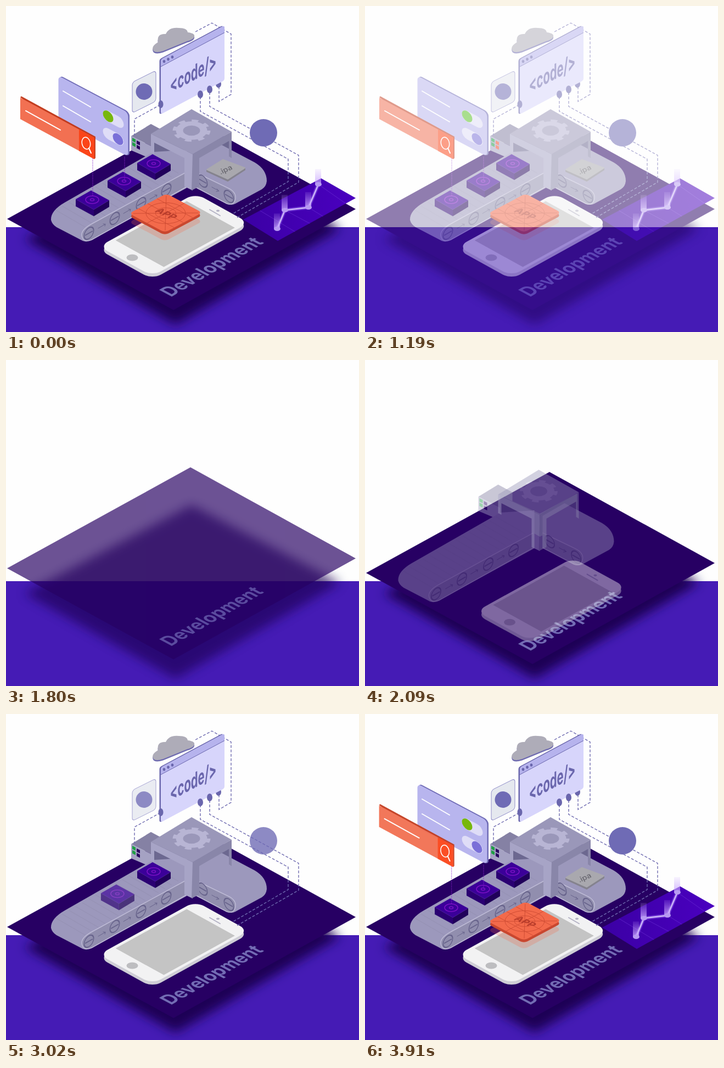
Recreate the animation shown at these times as an HTML page. Size 643 px wide and 594 px high, loop 3.96 s.

```html
<!DOCTYPE html>
<html lang="en">
<head>
<meta charset="utf-8">
<title>Development</title>
<style>
html, body { margin: 0; width: 100%; height: 100%; overflow: hidden; background: #fefefe; }
svg { display: block; width: 643px; height: 594px; --led: #2a0060; --on: #77b70c; }
text { font-family: Inter, "Open Sans", sans-serif; font-weight: 700; text-anchor: middle; }
.line { fill: none; stroke-linecap: round; }
.dash { fill: none; stroke: #6f6bb0; stroke-width: 1.4; stroke-dasharray: 5 3; }
.dots { stroke: #8a28cc; stroke-width: 1.3; stroke-dasharray: 1.3 1.7; }
</style>
</head>
<body>
<svg viewBox="0 0 643 594">
  <defs>
    <filter id="blur" x="-20%" y="-20%" width="140%" height="140%"><feGaussianBlur stdDeviation="10"/></filter>
    <linearGradient id="beam" x2="0" y2="1">
      <stop stop-color="#c9a8ff" stop-opacity=".12"/><stop offset="1" stop-color="#c9a8ff" stop-opacity=".8"/>
    </linearGradient>
    <linearGradient id="plate" x2="1">
      <stop stop-color="#3b00a4"/><stop offset="1" stop-color="#4a00c0"/>
    </linearGradient>
    <g id="roller" fill="none" stroke="#68648c" stroke-width="2">
      <circle r="10" transform="matrix(.866 -.5 0 1 0 0)"/><path d="M-7 4L7-4"/>
    </g>
    <path id="arrow" class="line" stroke="#68648c" d="M-7 4L6-3.5M2-4L6-3.5L5 0"/>
    <g id="cube">
      <path fill="#2a0072" d="M239 286L272 305V317L239 299Z"/>
      <path fill="#20005a" d="M272 305L300 288V300L272 317Z"/>
      <path fill="#3b0099" d="M239 286L267 270L300 288L272 305Z"/>
      <g fill="none" stroke="#7a10c4" stroke-width="1.6">
        <ellipse cx="269" cy="287" rx="12" ry="7"/><ellipse cx="269" cy="287" rx="3.5" ry="2"/>
      </g>
    </g>
    <g id="column">
      <path fill="url(#beam)" d="M-6-28H5V0H-6Z"/><ellipse rx="6" ry="4" fill="#b79af2"/>
    </g>
    <rect id="tile" x="-246" y="510" width="72.4" height="69.4" rx="7"/>
    <rect id="phone" x="-339" y="537.6" width="194" height="107.4" rx="17"/>
    <path id="cloud" d="M269 82Q263 74 277 66Q274 50 291 51Q297 38 315 40Q330 40 331 48Q347 50 342 58Q338 62 330 64L286 82Q273 86 269 82Z"/>
  </defs>

  <path fill="#fefefe" d="M0 0H643V403H0Z"/>
  <path fill="#451bb5" d="M0 403H643V594H0Z"/>

  <!-- data-in: start, duration, starting offset x and y -->
  <g id="scene">
    <path data-in="1620 420 0 0" fill="#1f0055" filter="url(#blur)" d="M338 264L609 406L309 581L34 425Z"/>
    <g data-in="1620 420 0 -45">
      <path fill="#270063" d="M336 204L637 370L305 554L2 388Z"/>
      <text transform="matrix(.87 -.505 1.05 .56 385.5 481)" font-size="30.2" fill="#736cb4">Development</text>
    </g>

    <g data-in="3200 520 -22 12">
      <path fill="url(#plate)" d="M432 389L574 314L637 350L495 428Z"/>
      <path class="line" stroke="#7a3fe0" stroke-width=".8" opacity=".6" d="M508 372L553 396M551 367L577 383M569 325L619 360M463 373L526 411"/>
      <g class="line">
        <path stroke="#8d5af0" stroke-width="7" opacity=".4" d="M494 406L508 372L551 367L569 325"/>
        <path stroke="#c6adf7" stroke-width="3" d="M494 406L508 372L551 367L569 325"/>
      </g>
      <use href="#column" x="494" y="406"/><use href="#column" x="508" y="372"/>
      <use href="#column" x="551" y="367"/><use href="#column" x="569" y="325"/>
    </g>

    <g data-in="1960 530 -50 28">
      <path fill="#8581a4" d="M228 237L264 215L290 229V250L268 257Z"/>
      <path fill="#a5a2c3" d="M228 237L268 257V280L228 263Z"/>
      <path fill="#1f9e45" d="M230 240l6 3v6l-6-3zM230 248l6 3v6l-6-3z"/>
      <path fill="var(--led)" d="M238 245l6 3v6l-6-3zM238 253l6 3v6l-6-3z"/>
      <path fill="#6c6890" d="M268 235L340 268L408 231V276L340 310L268 268Z"/>
      <path fill="#9c98bc" d="M268 266L107 358Q81 373 82 390Q84 398 92 403L140 428Q148 431 156 426L330 331V262Z"/>
      <path transform="matrix(.866 -.5 .866 .5 0 0)" stroke="#85819f" stroke-width="62" stroke-dasharray="1 13" opacity=".35" d="M-320 455H-114"/>
      <path fill="#918eae" stroke="#bdbad5" stroke-width="1.5" d="M328 303L158 396Q137 407 138 418Q140 432 156 426L328 330"/>
      <path fill="#9c98bc" d="M385 249L453 285Q475 298 475 319Q474 329 466 334L418 360Q411 364 402 360L345 330V272Z"/>
      <path fill="#918eae" stroke="#bdbad5" stroke-width="1.5" d="M345 303L405 332Q419 339 418 350Q416 365 402 360L345 330"/>
      <use href="#roller" x="151" y="414"/><use href="#roller" x="198" y="387"/>
      <use href="#roller" x="246" y="360"/><use href="#roller" x="292" y="335"/>
      <use href="#arrow" x="175" y="401"/><use href="#arrow" x="221" y="374"/><use href="#arrow" x="269" y="348"/>
      <g transform="matrix(-1 0 0 1 764 0)"><use href="#roller" x="406" y="319"/><use href="#roller" x="358" y="347"/></g>
      <path class="line" stroke="#68648c" d="M375 330L388 337M384 333L388 337L383 338"/>
    </g>

    <g data-in="3080 500 -35 -20">
      <path fill="#85838e" d="M365 298L404 316L436 295V299L404 320L365 302Z"/>
      <path fill="#a9a8ae" stroke="#a9a8ae" stroke-width="2" stroke-linejoin="round" d="M366 298L395 280L435 295L404 315Z"/>
      <text transform="matrix(.866 -.4 .4 .75 402 302)" font-size="15" style="font-weight:500" fill="#66656e">.ipa</text>
    </g>

    <use data-in="2500 500 -50 28" href="#cube"/>
    <g transform="translate(-54 32)"><use data-in="2830 460 -60 42" href="#cube"/></g>
    <g transform="translate(-112 66)"><use data-in="3100 490 -50 28" href="#cube"/></g>

    <g data-in="1960 530 -50 28">
      <path fill="#a7a4c6" d="M264 233L340 270V336L325 329V277L270 249V270L264 267Z"/>
      <path fill="#8986a9" d="M340 270L411 229V277L406 274V246L352 277V329L338 336Z"/>
      <path fill="#9a97b9" d="M264 233L338 188L411 229L340 270Z"/>
      <g transform="translate(338 227) scale(1 .59)" fill="none" stroke="#b8b5d4">
        <circle r="22" stroke-width="13"/><circle r="31" stroke-width="7" stroke-dasharray="12 12.35"/>
      </g>
    </g>

    <g data-in="1960 530 78 45">
      <g transform="matrix(.905 -.5 .905 .5 -10.3 0)">
        <use href="#phone" x="-6" y="6" fill="#cfced6"/>
        <use href="#phone" fill="#f2f2f3"/>
        <path fill="#c4c4c4" d="M-311 543H-168V640H-311Z"/>
      </g>
      <ellipse cx="230" cy="458.5" rx="10.5" ry="6" fill="#bdbdc0"/>
      <path class="line" stroke="#b4b2c4" stroke-width="2" d="M371 371L390 382"/>
      <ellipse cx="386" cy="373" rx="3" ry="1.8" fill="#b4b2c4"/>
    </g>

    <g data-in="3250 500 0 -25">
      <g transform="matrix(.94 -.5 .94 .5 -24 0)">
        <use href="#tile" x="-16" y="16" fill="#f4694a" opacity=".25"/>
        <use href="#tile" x="-5" y="5" fill="#c9472f"/>
        <use href="#tile" fill="#f36a4b"/>
        <g fill="none" stroke="#cf4c34" stroke-width=".8">
          <circle cx="-210" cy="545" r="27"/><circle cx="-210" cy="545" r="14"/>
          <path d="M-246 545H-174M-210 510V579M-242 514L-178 576M-178 514L-242 576M-228 510V579M-192 510V579"/>
        </g>
      </g>
      <text transform="matrix(.866 .4 -.75 .5 287 382)" font-size="19" fill="#b83c2b">APP</text>
    </g>

    <g data-in="2440 400 0 0" class="dash">
      <path d="M345 47L375 31L410 51V161L388 174V148M354 165V192L514 279V320L414 378M371 157V183L533 272V321L420 386M281 180L234 206V236"/>
    </g>

    <g data-in="2480 450 0 20">
      <use href="#cloud" y="2.5" fill="#6f6bb0"/><use href="#cloud" fill="#aeacb8"/>
      <g fill="#6a66ad">
        <ellipse cx="387" cy="142" rx="5" ry="7"/>
        <g transform="matrix(1 -.535 0 1 279.5 97)"><rect width="116" height="101" rx="4"/></g>
      </g>
      <g transform="matrix(1 -.535 0 1 282 97.5)">
        <rect width="116" height="100" rx="4" fill="#d7d5fb"/>
        <path fill="#b6b3ed" d="M0 13V4Q0 0 4 0H112Q116 0 116 4V13Z"/>
        <path stroke="#6a66ad" d="M0 13H116"/>
      </g>
      <g fill="#6a66ad">
        <ellipse cx="288" cy="101" rx="2.3" ry="2.7"/><ellipse cx="295.5" cy="97" rx="2.3" ry="2.7"/><ellipse cx="303" cy="93" rx="2.3" ry="2.7"/>
        <ellipse cx="282" cy="179" rx="4.5" ry="7"/><ellipse cx="354" cy="161" rx="5" ry="7"/><ellipse cx="371" cy="152" rx="5" ry="7"/>
        <text transform="matrix(.81 -.433 0 1.55 341 136)" font-size="25">&lt;code/&gt;</text>
      </g>
    </g>

    <g data-in="2750 500 0 0">
      <g transform="matrix(1 -.5 0 1 230 139)"><rect width="43" height="56" rx="5" fill="#e5e8ef" stroke="#8f8cc8"/></g>
      <circle cx="251.5" cy="156" r="15" fill="#6f6bb5"/>
      <circle cx="469" cy="231" r="25" fill="#6f6bb5"/>
    </g>

    <g data-in="3180 500 -30 -17">
      <path class="dots" d="M216 275V318"/>
      <g transform="matrix(1 .53 0 1 97.5 126)"><rect width="127.5" height="81" rx="7" fill="#706cb6"/></g>
      <g transform="matrix(1 .53 0 1 95.5 127)">
        <rect width="127" height="80" rx="7" fill="#b8b5ee"/>
        <g fill="#dfddf7"><rect x="81" y="16" width="38" height="20" rx="10"/><rect x="81" y="48" width="38" height="20" rx="10"/></g>
        <circle cx="90.5" cy="26" r="9.5" fill="var(--on)"/><circle cx="108.5" cy="58" r="9.5" fill="#7a70d8"/>
      </g>
      <path class="line" stroke="#fff" stroke-width="2" d="M104 155L154 184M104 182L154 211"/>
    </g>

    <g data-in="3610 400 -26 -14">
      <path class="dots" d="M158 278V346"/>
      <path fill="#c23a1c" d="M26 166L28 164.5L163 238V277L161 279Z"/>
      <path fill="#f26e50" d="M26 167L161 240V279L26 206Z"/>
      <path fill="#fb4316" d="M133 225L161 240V279L133 264Z"/>
      <g class="line" stroke="#fff" stroke-width="2">
        <path d="M36 191L99 226M151 259L155 268"/>
        <ellipse cx="146" cy="250" rx="7.5" ry="11" transform="rotate(-12 146 250)" stroke-width="1.6"/>
      </g>
    </g>
  </g>
</svg>
<script>
const LOOP = 3960, FADE = 870, BLANK = 1520;
const svg = document.querySelector('svg'), scene = document.getElementById('scene');
const clamp = v => Math.min(1, Math.max(0, v));
const parts = [...document.querySelectorAll('[data-in]')].map(el => {
  const [start, span, dx, dy] = el.dataset.in.split(' ').map(Number);
  return { el, start, span, dx, dy };
});

function draw(t) {
  const leaving = t >= 50 && t < BLANK;
  const time = t < 50 ? t + LOOP : t;
  scene.setAttribute('opacity', leaving ? clamp(1 - (t - FADE) / (BLANK - FADE)) : 1);
  const fading = leaving && t >= 910;
  svg.style.setProperty('--led', fading ? '#f04a2c' : '#2a0060');
  svg.style.setProperty('--on', fading ? '#57c022' : '#77b70c');
  for (const { el, start, span, dx, dy } of parts) {
    const rest = leaving ? 0 : 1 - clamp((time - start) / span);
    const away = rest ** 3;
    el.setAttribute('opacity', 1 - rest ** 2);
    el.setAttribute('transform', `translate(${dx * away} ${dy * away})`);
  }
}

let begin;
function tick(now) {
  begin ??= now;
  draw((now - begin) % LOOP);
  requestAnimationFrame(tick);
}
draw(0);
requestAnimationFrame(tick);
</script>
</body>
</html>
```
